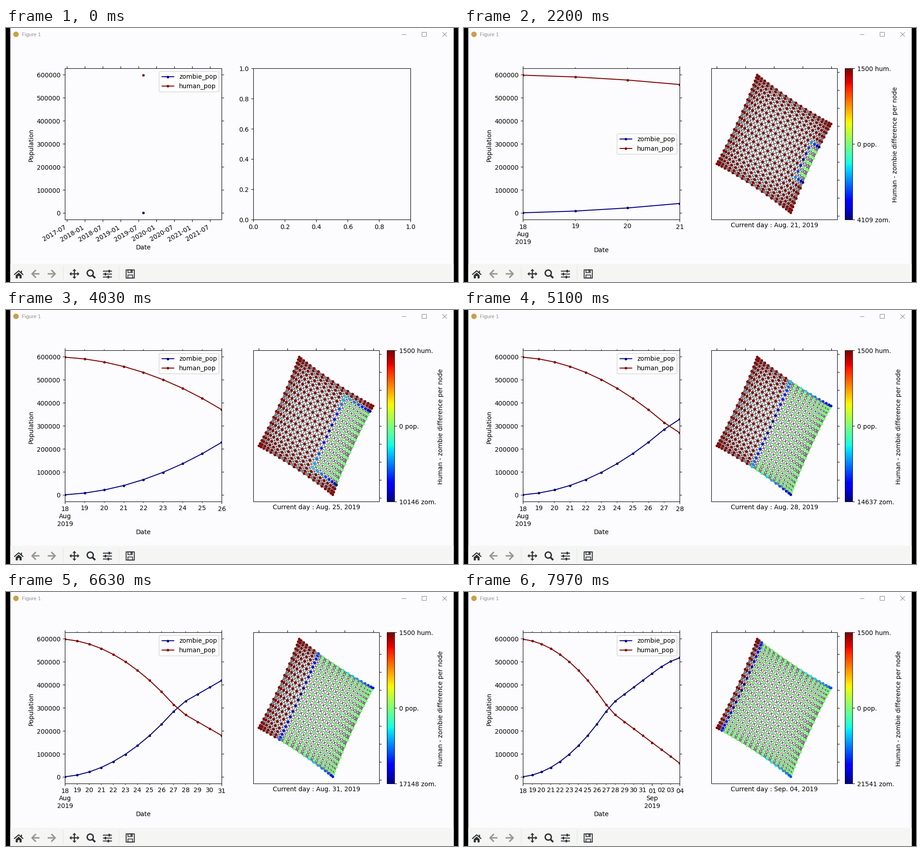
A matplotlib script that plays this animation: 998 px wide and 561 px high, repeating every 8 s.

```python
import numpy as np
import matplotlib.pyplot as plt
from matplotlib.animation import FuncAnimation
from matplotlib.collections import LineCollection
from matplotlib.patches import Circle, FancyBboxPatch, Polygon, Rectangle

W, H, DPI = 998, 561, 128
PT = 72 / DPI                      # points per pixel
LOOP, STEP = 8000, 50
N, ORIGIN_ROW = 20, 9              # grid size, first infected row
NAVY, MAROON, INK = "#000080", "#800000", "#2e3336"
JET = plt.get_cmap("jet")
LEFT, RIGHT, TOP, BOTTOM = 130.5, 476.5, 89.5, 423.5

fig = plt.figure(figsize=(W / DPI, H / DPI), dpi=DPI, facecolor="black")
window = fig.add_axes([0, 0, 1, 1])
plot = fig.add_axes([0, 0, 1, 1])


def pixel_space(ax):
    ax.clear()
    ax.set(xlim=(0, W), ylim=(H, 0))
    ax.axis("off")


def line(ax, points, color="black", width=1.1, **kw):
    return ax.plot(*zip(*points), color=color, lw=width * PT, snap=False,
                   solid_capstyle="butt", **kw)[0]


def box(ax, x0, y0, x1, y1, edge="black", width=1.1, fill="none", z=2.5):
    ax.add_patch(Rectangle((x0, y0), x1 - x0, y1 - y0, fc=fill, ec=edge,
                           lw=width * PT, snap=False, zorder=z))


def text(ax, x, y, s, size=13.889, **kw):
    return ax.text(x, y, s, fontsize=size * PT, **kw)


def ticks(segments, width=1.1):
    plot.add_collection(LineCollection(segments, colors="black",
                                       linewidths=width * PT, snap=False))


def x_ticks(xs, y, length, width=1.1):
    ticks([[(x, y), (x, y + length)] for x in xs], width)


def y_ticks(ys, x, length):
    ticks([[(x, y), (x + length, y)] for y in ys])


# ---- window frame and toolbar -------------------------------------------

def draw_window():
    ax = window
    pixel_space(ax)
    box(ax, 9.5, 0, 988.5, H, width=0, fill="#fcfcfe", z=0)
    box(ax, 9.5, 521, 988.5, H, width=0, fill="#f5f5f3", z=0)
    ax.add_patch(Circle((22, 14), 6, fc="#c9a04a", ec="none"))
    text(ax, 35, 18, "Figure 1", 11.4, color="#909090",
         family="Liberation Sans")
    grey = "#858585"
    line(ax, [(874, 14.5), (884, 14.5)], grey, 1)
    box(ax, 918.5, 9.5, 928.5, 18.5, grey, 1)
    line(ax, [(963.5, 9.5), (973.5, 19)], grey, 1)
    line(ax, [(963.5, 19), (973.5, 9.5)], grey, 1)
    for x in (126.5, 249.5):
        line(ax, [(x, 526), (x, 558)], "#e2e2e2", 1)

    # home
    line(ax, [(18, 545), (28, 536.3), (38, 545)], INK, 2.3)
    ax.add_patch(Polygon([(21.5, 546), (28, 540.3), (34.5, 546), (34.5, 553),
                          (30, 553), (30, 548), (26, 548), (26, 553),
                          (21.5, 553)], fc=INK, ec="none"))
    box(ax, 32.8, 536, 35.3, 541.5, width=0, fill=INK)
    # back and forward
    for x, d in ((65, 1), (101, -1)):
        line(ax, [(x - 8 * d, 543), (x + 9 * d, 543)], "#979797", 3.2)
        line(ax, [(x + d, 534.5), (x - 7.5 * d, 543), (x + d, 551.5)],
             "#979797", 3.2)
    # pan
    line(ax, [(143, 543), (159, 543)], INK, 2.5)
    line(ax, [(151, 535), (151, 551)], INK, 2.5)
    for dx, dy in ((1, 0), (-1, 0), (0, 1), (0, -1)):
        tip, base = 11, 6.5
        ax.add_patch(Polygon(
            [(151 + tip * dx, 543 + tip * dy),
             (151 + base * dx + 4.3 * dy, 543 + base * dy + 4.3 * dx),
             (151 + base * dx - 4.3 * dy, 543 + base * dy - 4.3 * dx)],
            fc=INK, ec="none"))
    # zoom
    ax.add_patch(Circle((186, 541.3), 6.7, fc="none", ec=INK, lw=3 * PT))
    line(ax, [(190.8, 546.2), (197, 552.2)], INK, 4)
    # sliders
    for y, knob in ((537, 228), (543.5, 219.5), (550, 226)):
        line(ax, [(214, y), (234, y)], INK, 2)
        box(ax, knob - 1.7, y - 3, knob + 1.7, y + 3, width=0, fill=INK)
    # save
    box(ax, 265.3, 534.3, 283.3, 552.3, INK, 2)
    box(ax, 269.3, 534.3, 278.8, 540.3, INK, 1.7)
    box(ax, 275, 535, 277.5, 539, width=0, fill=INK)
    box(ax, 269.3, 545.5, 279.5, 552.3, INK, 1.7)


# ---- model --------------------------------------------------------------

def populations(day):
    d = np.arange(day + 1)
    infected = 1500 * (d + 1) * np.minimum(2 * d + 1, N)
    losses = np.select([d == 15, d == 16, d == 17], [1000, 8000, 22000], 0)
    return infected - losses, 600000 - infected


def largest_horde(day):
    return int(round(np.interp(day, [0, 1, 3, 7, 10, 13, 17],
                               [1500, 1700, 4109, 10146, 14637, 17148, 21541])))


def node_levels(day):
    """Scaled human - zombie difference, 1 (humans) to -1 (zombies)."""
    col, row = np.meshgrid(np.arange(N), np.arange(N))
    depth, side = N - 1 - col, np.abs(row - ORIGIN_ROW)
    reach = np.maximum(depth, side)
    level = np.where(reach > day, 1.0, 0.0)
    if day == 0:
        return np.where(reach == 0, -1.0, level)
    if day < 10:
        corner = 0.2 + 0.75 / day
        along = 1 - np.minimum(depth, side) / day
        ring = corner + (1 - corner) * along ** 0.95
        # the corner of the ring is the weakest spot
        ring = corner + (1 - corner) * (1 - np.minimum(depth, side) / day)
        return np.where(reach == day, -ring, level)
    pile = 13000 / largest_horde(day) * np.clip((col - 10) / 9, 0, 1) ** 0.7
    level = np.where((row % (N - 1) == 0) & (depth < day), -pile, level)
    corner = min(0.35 + 0.08 * (day - 10), 0.65)
    along = np.minimum(row, N - 1 - row) / 9
    front = corner + (1 - corner) * along ** 0.75
    return np.where(depth == day, -front, level)


def node_positions():
    spread = np.sin(np.linspace(-1.22, 1.22, N)) / np.sin(1.22)
    p, q = np.meshgrid(spread, spread)
    p, q = p * (1 - 0.038 * (1 - q * q)), q * (1 - 0.038 * (1 - p * p))
    return np.dstack([684.5 + 81.5 * p - 44.5 * q, 256 + 54 * p + 98 * q])


NODES = node_positions()
EDGES = [(NODES[r, c], NODES[r + dr, c + dc])
         for r in range(N) for c in range(N)
         for dr, dc in ((0, 1), (1, 0), (1, 1), (1, -1))
         if r + dr < N and 0 <= c + dc < N]


# ---- left chart ---------------------------------------------------------

def pop_y(value):
    return 408.9 - 0.509 * value / 1000


def slanted_labels(xs, names):
    x_ticks(xs, BOTTOM, 4.9)
    x_ticks(xs, TOP, -4.9)
    for x, name in zip(xs, names):
        text(plot, x, 433.2, name, rotation=30, ha="right", va="top")


def day_labels(xs, day):
    major = [k for k in range(day + 1) if k in (0, day, 14)]
    minor = [k for k in range(day + 1) if k not in major]
    for group, size, width in ((major, 4.9, 1.1), (minor, 2.8, 0.85)):
        x_ticks(xs[group], BOTTOM, size, width)
        x_ticks(xs[group], TOP, -size, width)
    for k in range(day + 1):
        name = f"{18 + k if k < 14 else k - 13:02d}"
        if k == 0 and day < 14:
            name += "\nAug\n2019"
        if k == 14:
            name += "\nSep\n2019"
        text(plot, xs[k], 433.2 if k in major else 431, name,
             ha="center", va="top")


def draw_legend(y):
    plot.add_patch(FancyBboxPatch(
        (338, y), 132, 45, boxstyle="round,pad=0,rounding_size=2.8",
        fc=(1, 1, 1, 0.8), ec=(0.8, 0.8, 0.8, 0.8), lw=1.39 * PT, zorder=5))
    for dy, name, color in ((11.5, "zombie_pop", NAVY),
                            (32.3, "human_pop", MAROON)):
        line(plot, [(343.5, y + dy), (371.5, y + dy)], color, 2.08, zorder=6)
        line(plot, [(357.5, y + dy)], color, marker=".",
             ms=8.33 * PT, mew=1.39 * PT, zorder=6)
        text(plot, 382, y + dy + 4.7, name, zorder=6)


def draw_chart(day):
    box(plot, LEFT, TOP, RIGHT, BOTTOM)
    levels = range(0, 600001, 100000)
    y_ticks([pop_y(v) for v in levels], LEFT, -4.9)
    y_ticks([pop_y(v) for v in levels], RIGHT, 4.9)
    for v in levels:
        text(plot, 120.3, pop_y(v), str(v), ha="right", va="center_baseline")
    text(plot, 55.2, 258, "Population", rotation=90, ha="center", va="center")

    if day == 0:
        xs = np.array([303.5])
        slanted_labels(135 + 39.5 * np.arange(9),
                       [f"{2017 + (k + 1) // 2}-{'01' if k % 2 else '07'}"
                        for k in range(9)])
    elif day == 1:
        xs = np.array([146, 461])
        slanted_labels(np.linspace(146, 461, 9),
                       [f"08-{18 + k // 8} {3 * k % 24:02d}" for k in range(9)])
    else:
        xs = np.linspace(LEFT, RIGHT, day + 1)
        day_labels(xs, day)
    text(plot, 303.5, {0: 485, 1: 488}.get(day, 491), "Date",
         ha="center", va="center")

    for values, color in zip(populations(day), (NAVY, MAROON)):
        curve = line(plot, list(zip(xs, pop_y(values))), color, 2.08,
                     marker=".", ms=8.33 * PT, mew=1.39 * PT)
        curve.set_clip_path(Rectangle((LEFT, TOP), RIGHT - LEFT, BOTTOM - TOP,
                                      transform=plot.transData))
    draw_legend(233.7 if 1 <= day <= 6 else 96)


# ---- right panel --------------------------------------------------------

def draw_empty_axes():
    box(plot, 546.5, TOP, 893.5, BOTTOM)
    xs, ys = np.linspace(546.5, 893.5, 6), np.linspace(BOTTOM, TOP, 6)
    x_ticks(xs, BOTTOM, 4.9)
    y_ticks(ys, 546.5, -4.9)
    for k in range(6):
        text(plot, xs[k], 433.2, f"{k / 5:.1f}", ha="center", va="top")
        text(plot, 536.5, ys[k], f"{k / 5:.1f}", ha="right",
             va="center_baseline")


def draw_graph(day):
    box(plot, 546.5, TOP, 824.5, BOTTOM)
    x_ticks(np.linspace(558.5, 811.5, 5), TOP, -4.9)
    y_ticks(np.linspace(98, 415.5, 9), 824.5, 4.9)
    date = f"Aug. {18 + day}" if day < 14 else f"Sep. {day - 13:02d}"
    text(plot, 685.2, 435.5, f"Current day : {date}, 2019",
         ha="center", va="center")

    plot.add_collection(LineCollection(EDGES, colors=(0, 0, 0, 0.8),
                                       linewidths=1.1 * PT, zorder=1))
    plot.scatter(*NODES.reshape(-1, 2).T, s=(6 * PT) ** 2, linewidths=0,
                 c=JET((node_levels(day).ravel() + 1) / 2), zorder=2)

    horde = largest_horde(day)
    plot.imshow(np.linspace(1, 0, 256)[:, None], cmap=JET, aspect="auto",
                extent=(841.5, 858, BOTTOM, TOP), zorder=1)
    box(plot, 841.5, TOP, 858, BOTTOM)
    marks = (TOP, 256.5, BOTTOM)
    y_ticks(marks, 858, 4.9)
    for y, name in zip(marks, ("1500 hum.", "0 pop.", f"{horde} zom.")):
        text(plot, 868, y, name, va="center_baseline")
    text(plot, 960 if horde > 9999 else 952, 257,
         "Human - zombie difference per node",
         rotation=90, ha="center", va="center")


# ---- timing -------------------------------------------------------------

CHART_TIMES = np.interp(np.arange(1, 18), [1, 8, 14, 17],
                        [860, 3990, 6640, 7850])
GRAPH_TIMES = np.concatenate([[500], CHART_TIMES + 80])
shown = {"state": None}


def init():
    shown["state"] = None
    return []


def update(frame):
    t = frame * STEP
    chart_day = int(np.sum(CHART_TIMES <= t))
    graph_day = int(np.sum(GRAPH_TIMES <= t)) - 1
    if shown["state"] != (chart_day, graph_day):
        shown["state"] = (chart_day, graph_day)
        pixel_space(plot)
        draw_chart(chart_day)
        if graph_day < 0:
            draw_empty_axes()
        else:
            draw_graph(graph_day)
    return []


draw_window()
anim = FuncAnimation(fig, update, frames=LOOP // STEP, init_func=init,
                     interval=STEP, repeat=True, repeat_delay=0)
plt.show()
```
